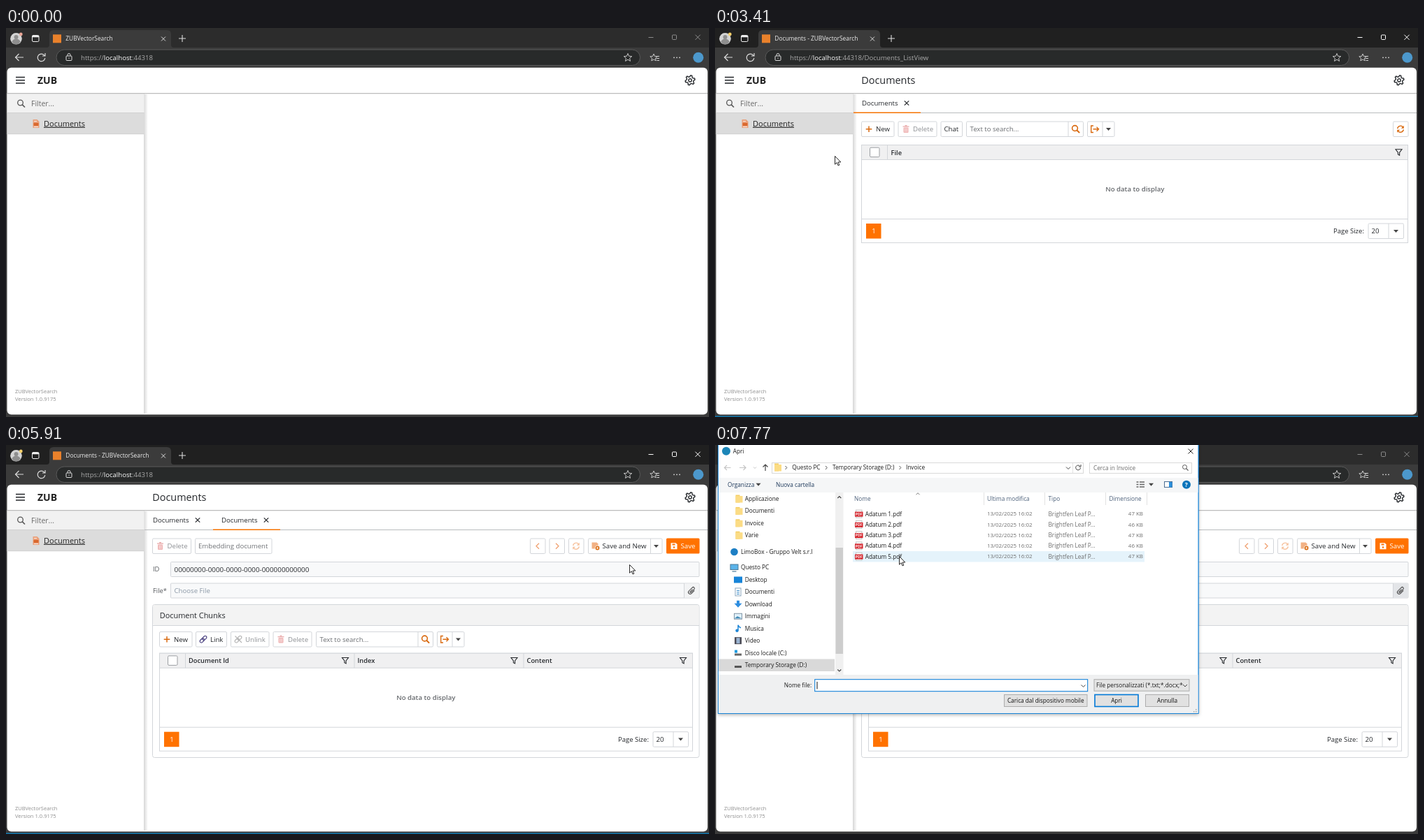
Animation of 1005x557 px, one loop 8000 ms. Source, as an HTML page:

```html
<!DOCTYPE html>
<html lang="it">
<head>
<meta charset="utf-8">
<title>Vector search demo</title>
<style>
  html, body { margin: 0; width: 100%; height: 100%; overflow: hidden; background: #3b3b3b; }
  svg { display: block; width: 1005px; height: 557px; font-family: "Open Sans", "Noto Sans", sans-serif; }
  text { white-space: pre; }
</style>
</head>
<body>
<svg id="stage" viewBox="0 0 1005 557"></svg>
<script>
const ORANGE = '#f57300', BTN = '#d3d6da', INK = '#24272b', PALE = '#f7c3a0', BLUE = '#0078d7';

// Drawing helpers; text is placed by its vertical centre.
const text = (x, y, s, size = 9.65, fill = INK, weight = 400, extra = '') =>
  `<text x="${x}" y="${y + size * .36}" font-size="${size}" fill="${fill}" font-weight="${weight}" ${extra}>${s}</text>`;
const rect = (x, y, w, h, fill = 'none', stroke = 'none', r = 0, extra = '') =>
  `<rect x="${x}" y="${y}" width="${w}" height="${h}" rx="${r}" fill="${fill}" stroke="${stroke}" ${extra}/>`;
const path = (d, stroke = INK, width = 1, fill = 'none') =>
  `<path d="${d}" stroke="${stroke}" stroke-width="${width}" fill="${fill}"/>`;
const dot = (x, y, r, fill, stroke = 'none', width = 1) =>
  `<circle cx="${x}" cy="${y}" r="${r}" fill="${fill}" stroke="${stroke}" stroke-width="${width}"/>`;
const at = (x, y, s) => `<g transform="translate(${x} ${y})">${s}</g>`;
const layer = (id, s) => `<g id="${id}">${s}</g>`;

// Small icons, each centred on its point.
const cross = (x, y, r, c, w = 1) => path(`M${x - r} ${y - r}l${2 * r} ${2 * r}m0 ${-2 * r}l${-2 * r} ${2 * r}`, c, w);
const plus = (x, y, r, c, w) => path(`M${x - r} ${y}h${2 * r}M${x} ${y - r}v${2 * r}`, c, w);
const caret = (x, y, c = '#444') => path(`M${x - 3.5} ${y - 2}h7l-3.5 4z`, 'none', 0, c);
const chevron = (x, y, c, r = 2.5) => path(`M${x - r} ${y - r / 2}l${r} ${r} ${r} ${-r}`, c);
const lens = (x, y, r, c, w) => dot(x - 1, y - 1, r, 'none', c, w) + path(`M${x - 1 + r * .7} ${y - 1 + r * .7}l${r} ${r}`, c, w * 1.25);
const funnel = (x, y) => path(`M${x - 4.5} ${y - 4.2}h9l-3.4 4.4v4l-2.2-1.2v-2.8z`, INK, 1.1);
const trash = (x, y) => path(`M${x - 4.5} ${y - 3.5}h9M${x - 1.5} ${y - 5}h3`, '#e9a9a9', 1.2) +
  rect(x - 3.5, y - 2.2, 7, 7.4, '#efb5b5', 'none', 1) + path(`M${x - 1.2} ${y - 1}v5m2.4-5v5`, '#fff', .7);
const cycle = (x, y, c) => path(`M${x - 4.3} ${y - .6}a4.4 4.4 0 0 1 8-2M${x + 4.3} ${y + .6}a4.4 4.4 0 0 1-8 2`, c, 1.4) +
  path(`M${x + 4.8} ${y - 5}v4h-4zM${x - 4.8} ${y + 5}v-4h4z`, 'none', 0, c);
const chain = (x, y, c) => at(x, y, `<g transform="rotate(-45)">${rect(-6, -2.1, 7, 4.2, 'none', c, 2.1, 'stroke-width="1.2"')}${rect(-1, -2.1, 7, 4.2, 'none', c, 2.1, 'stroke-width="1.2"')}</g>`);
const clip = (x, y) => at(x, y, `<g transform="rotate(45)">${path('M2.6-3V3a2.6 2.6 0 0 1-5.2 0V-4a1.8 1.8 0 0 1 3.6 0V2.5a.8.8 0 0 1-1.6 0V-2.5', '#444', 1)}</g>`);
const disk = (x, y, c) => path(`M${x - 4.5} ${y - 4.5}h7l2 2v7h-9z`, 'none', 0, c);
const star = (x, y, r) => path('M' + Array.from({ length: 10 }, (_, i) => {
  const a = i * Math.PI / 5, q = i % 2 ? r * .45 : r;
  return (x + q * Math.sin(a)).toFixed(1) + ' ' + (y - q * Math.cos(a)).toFixed(1);
}).join('L') + 'z', '#c8c8c8');
const gear = (x, y) => path('M' + Array.from({ length: 24 }, (_, i) => {
  const a = (i + .5) * Math.PI / 12, q = i % 4 < 2 ? 5 : 7;
  return (x + q * Math.cos(a)).toFixed(1) + ' ' + (y + q * Math.sin(a)).toFixed(1);
}).join('L') + 'z', INK, 1.4) + dot(x, y, 2.2, 'none', INK, 1.4);

// Page widgets.
const button = (x, y, w, label = '', labelX = 4.5, color = INK) =>
  rect(x, y, w, 21.5, '#fff', BTN, 1.5) + text(x + labelX, y + 10.7, label, 9.65, color);
const newButton = (x, y) => button(x, y, 46.5, 'New', 20.5) + plus(x + 10.5, y + 10.7, 4.3, '#d96a10', 1.5);
const deleteButton = (x, y) => button(x, y, 55, 'Delete', 21, '#8b8e92') + trash(x + 11, y + 10.7);
const searchBox = (x, y) => button(x, y, 167, 'Text to search...', 5, '#6a6d71') +
  path(`M${x + 145.5} ${y}v21.5`, BTN) + lens(x + 156, y + 10.5, 3.9, '#d96a10', 1.6);
const exportBox = (x, y) => button(x, y, 38.5) + path(`M${x + 21.5} ${y}v21.5`, BTN) + caret(x + 30, y + 11) +
  path(`M${x + 8.5} ${y + 6}h-3.3v9.5h3.3M${x + 8} ${y + 10.7}h8m-3-3l3 3-3 3`, '#d96a10', 1.4);

function grid(x, y, w, cols) {
  const right = x + w;
  return rect(x, y, w, 140, '#fff', BTN) + rect(x, y, w, 21, '#f0f0f1', BTN) +
    path(`M${x + 37} ${y}v21M${x} ${y + 106}h${w}`, BTN) +
    rect(x + 12, y + 3.7, 13.5, 13.5, '#fff', '#9a9da1', 1.5) +
    cols.map(([cx, name, end], i) => text(cx, y + 10.7, name, 9.3, INK, 600) + funnel(end, y + 10.5) +
      (i ? path(`M${cx - 4.5} ${y}v21`, BTN) : '')).join('') +
    text(600.3, y + 63.5, 'No data to display', 9.65, '#65686c', 600, 'text-anchor="middle"') +
    rect(x + 6.5, y + 112.5, 21.5, 21.5, '#ff7200') + text(x + 14.7, y + 123.2, '1', 9.5, '#fff') +
    text(right - 106.5, y + 123.2, 'Page Size:', 9.5) +
    rect(right - 56.5, y + 112.5, 50.5, 21.5, '#fff', BTN, 1.5) + text(right - 52, y + 123.2, '20', 9.65) +
    path(`M${right - 27.5} ${y + 112.5}v21.5`, BTN) + caret(right - 17, y + 123.4);
}
const pageTab = x => text(x, 107.5, 'Documents') + cross(x + 64, 107.5, 3.2, INK, 1.2);
const tabs = (...xs) => text(209.3, 74.8, 'Documents', 14.4, INK, 500) + path('M198 121.5H1003', '#b9bbbe') +
  xs.map(pageTab).join('') + path(`M${xs.at(-1) - 12} 121.3h96`, ORANGE, 1.6);

function browser() {
  const tool = '#dcdcdc';
  return rect(0, 0, 1005, 557, '#3b3b3b') + rect(0, 0, 1005, 28, '#202020', 'none', 0, 'id="bar"') +
    path('M58 28q4 0 4-4V9q0-6 6-6h162q6 0 6 6v15q0 4 4 4z', 'none', 0, '#3b3b3b') +
    dot(14.5, 15.3, 8.3, '#d4d4d4') + dot(14.5, 13, 3, '#8e8e8e') + path('M8.5 20.5a6 5 0 0 1 12 0a8 8 0 0 1-12 0z', 'none', 0, '#8e8e8e') +
    `<circle id="badge" cx="21.3" cy="9" r="2.4"/>` +
    rect(37.5, 10.5, 9.5, 9, 'none', '#eee', 1.5) + path('M37.5 12h9.5', '#eee', 2.5) +
    rect(67, 9.3, 12, 12, '#e9812b') + layer('title', text(85.3, 15.2, '', 8.35, '#eee')) +
    cross(225, 15.5, 3, '#ddd') + plus(252, 15, 5, '#ddd', 1.1) +
    layer('controls', path('M918.5 13.5h7', 'currentColor') + rect(952.5, 10, 6, 6.5, 'none', 'currentColor', 1) + cross(989, 13.3, 3.6, 'currentColor')) +
    path('M25 42H13.5m5-5l-5 5 5 5', tool, 1.2) +
    path('M55 39.5a5.3 5.3 0 1 0 .8 3.5M56 36v4h-4', tool, 1.2) +
    rect(72, 31, 834.5, 22.5, '#282a2a', '#5a5a5a', 11.2) +
    rect(86, 40, 8, 6.5, 'none', '#ddd', 1) + path('M88 40v-1.5a2 2 0 0 1 4 0V40M90 42.5v1.5', '#ddd') +
    `<text x="107" y="45.6" font-size="9.6" fill="#a9a9a9">https://<tspan fill="#fff">localhost</tspan>:44318<tspan id="route">/Documents_ListView</tspan></text>` +
    star(889, 42.5, 6) + star(926, 42.5, 5.5) + path('M929 40.5h5m-4.500 3h4.500m-3.500 3h3.500', '#d0d0d0') +
    [955, 959, 963].map(x => dot(x, 42.3, .9, '#ddd')).join('') + dot(989.7, 42.2, 7.5, '#4c98cc') +
    rect(0, 555.5, 1005, 1.5, '#1278ae', 'none', 0, 'id="edge"');
}

function shell() {
  return rect(1.5, 56.7, 1001.5, 496.8, '#fff', 'none', 6) +
    rect(198, 95, 5, 457, 'url(#shade)') + path('M197.500 94V552', '#d9d9d9') +
    rect(1.5, 94, 196, 27.5, '#f1f1f1') + rect(1.5, 121.5, 196, 30.5, '#dcdcdc') + path('M1.500 121.500h196M1.500 151.700h196', '#d0d0d0') +
    path('M1.500 93.700H1003', '#bcbcbc', 1.3) +
    path('M14 70.500h13M14 74.700h13M14 79h13', INK, 1.4) +
    text(45, 75, 'ZUB', 14, '#222', 700, 'font-stretch="75%"') + gear(978, 74.8) +
    lens(21.5, 108, 3.8, '#555', 1.3) + text(36, 107.800, 'Filter...', 10.5, '#6b6b6b') +
    path('M38.500 131h6l3 3v9h-9z', 'none', 0, '#eaa07a') + rect(39.5, 136, 7, 3.8, '#d9662c') + path('M40 133.500h4M40 141.500h6', '#fff', .8) +
    text(54, 136.800, 'Documents', 11, '#222', 500, 'text-decoration="underline"') +
    text(13, 520, 'ZUBVectorSearch', 7.5, '#8e8e8e') + text(13, 531, 'Version 1.0.9175', 7.6, '#8e8e8e');
}

function listView() {
  const y = 134;
  return tabs(210) + newButton(209.5, y) + deleteButton(262, y) + button(323, y, 30.5, 'Chat') +
    searchBox(359.5, y) + exportBox(532.5, y) + button(969.5, y, 21.5) + cycle(980, y + 10.7, '#d96a10') +
    grid(209.5, 167.5, 781, [[251.5, 'File', 977.5]]);
}

function detailView() {
  const y = 134, y2 = 267.5;
  return tabs(210, 308) + deleteButton(209.5, y) + button(270.5, y, 109.5, 'Embedding document', 4.5, '#6f7276') +
    button(749.5, y, 21.5) + path('M762 140.700l-4 4 4 4', '#f0a070', 1.3) +
    button(777, y, 21.5) + path('M786 140.700l4 4-4 4', '#f0a070', 1.3) +
    button(804.5, y, 21.5) + cycle(815, 144.7, PALE) +
    button(832.5, y, 105.5, 'Save and New', 20, INK) + path('M921.500 134v21.500', BTN) + caret(929.5, 145) +
    disk(842, 144, '#f2b184') + dot(845.5, 147.5, 3.4, '#d96a10', '#fff', .8) + plus(845.5, 147.5, 1.7, '#fff', .8) +
    rect(944, 133.5, 47.5, 22, '#ff7200', 'none', 1.5) + disk(955, 144.7, '#fff') + rect(952.5, 141.5, 4, 2, '#ff7200') + dot(955, 146.5, 1.3, '#ff7200') +
    text(964.5, 144.7, 'Save', 9.65, '#fff') +
    text(210, 178, 'ID', 9.4, '#55585c') + rect(235.5, 167.5, 755.5, 21, '#f8f9fa', BTN, 1) + text(240.5, 178, '00000000-0000-0000-0000-000000000000', 9.85) +
    text(210, 208.7, 'File*', 9.4, '#55585c') + rect(235.5, 198, 755.5, 21, '#f8f9fa', BTN, 1, 'id="field"') + text(240.5, 208.7, 'Choose File', 9.65, '#8a97a5') +
    rect(970, 198.5, 20.5, 20, '#f3f4f5', 'none', 0, 'id="pick"') + path('M969.500 198v21', BTN) + clip(980.2, 208.7) +
    rect(209.5, 228.5, 781.5, 219, '#fff', BTN, 3) + rect(210, 229, 780.5, 29, '#f3f3f3', 'none', 2.5) + path('M210 258.500h781', BTN) +
    text(219.8, 243.7, 'Document Chunks', 10.9) +
    newButton(219.5, y2) + button(271.5, y2, 44, 'Link', 20.5) + chain(282, 278.2, '#4a4180') +
    button(321.5, y2, 54.5, 'Unlink', 20.5, '#8b8e92') + chain(332, 278.2, '#b5b5b5') + path('M327.500 273.500l9.500 9.500', '#b5b5b5', 1.1) +
    deleteButton(382, y2) + searchBox(443.5, y2) + exportBox(616.5, y2) +
    grid(219.5, 298.2, 762, [[261, 'Document Id', 485], [502.5, 'Index', 726.5], [744.5, 'Content', 968]]);
}

const loading = () => rect(458, 289.7, 88.5, 31, '#fff', 'none', 15.5, 'filter="url(#soft)"') +
  path('M463.700 308.500A11 11 0 1 1 478 315.300', ORANGE, 2.4) + text(492.5, 305.2, 'Loading...', 9.65);

// File dialog.
const label = (x, y, s, fill = '#1c1c1c', extra = '') => text(x, y, s, 8.25, fill, 400, extra);
const folder = (x, y) => rect(x - 4.5, y - 5.5, 6, 11, '#f5cd62') + rect(x - 4.5, y - 4, 10, 9.5, '#fbdc85');
const frame = () => rect(4.5, -2, 686.5, 386.5, '#fff', '#1883d7', 0, 'filter="url(#soft)"') +
  rect(4.5, -2, 686.5, 386.5, '#fff', '#1883d7') + rect(5, 329, 685.5, 55, '#eff0f1') +
  dot(16, 8.7, 6, '#1c86b8') + label(25.7, 9.3, 'Apri') + cross(680, 9, 3.5, '#222');

const blanks = () => [[99, 338, 40, 11], [142, 335.5, 391, 17.5], [542, 335.5, 137, 17], [412, 356.5, 121, 19],
  [542, 356.5, 64, 19], [614, 356.5, 65, 19], [679, 372, 11.5, 12]].map(b => rect(...b, '#fff')).join('');

const places = [
  ['Desktop', (x, y) => rect(x - 6, y - 4.5, 12, 9, '#1784d8')],
  ['Documenti', (x, y) => rect(x - 4, y - 5.5, 8, 11, '#fff', '#8aa6bd') + path(`M${x - 2} ${y - 2}h4m-4 2.500h4m-4 2.500h4`, '#3a8bc8')],
  ['Download', (x, y) => path(`M${x - 2} ${y - 5}h4v4h3.500l-5.500 6-5.500-6h3.500z`, 'none', 0, '#2f8ee0')],
  ['Immagini', (x, y) => rect(x - 5.5, y - 4, 11, 8, '#dff0fb', '#8296a6') + path(`M${x - 5} ${y + 3}l4-3 6 3z`, 'none', 0, '#3d88b4')],
  ['Musica', (x, y) => path(`M${x} ${y + 3}v-8q1 3 4 4`, '#1f86d6', 1.5) + dot(x - 1.5, y + 3, 2.2, '#1f86d6')],
  ['Video', (x, y) => rect(x - 5, y - 5, 10, 10, '#4b4b55') + rect(x - 2.5, y - 4, 5, 8, '#9ab4d2')],
  ['Disco locale (C:)', (x, y) => rect(x - 5, y + 1, 10, 3, '#666') + rect(x - 5, y - 4, 4, 4, '#1c9ade')],
  ['Temporary Storage (D:)', (x, y) => rect(x - 5, y + 1, 10, 3, '#555')],
];

function dialogBody() {
  const grey = '#6d6d6d', head = '#4c607a', line = '#e2e2e2';
  const arrow = (x, c, turn) => at(x, 32.5, `<g transform="rotate(${turn})">${path('M4.500 0h-9m3.500-3.500L-4.500 0l3.500 3.500', c, 1.2)}</g>`);
  const step = x => path(`M${x - 1} 30l2.300 2.500-2.300 2.500`, '#555');
  const bar = arrow(18, '#c4c4c4', 0) + arrow(39.5, '#c4c4c4', 180) + chevron(57, 32.5, '#c4c4c4', 2) + arrow(72, '#444', 90) +
    rect(81.5, 25.5, 445, 15, '#fff', '#d9d9d9') + folder(89.5, 32) + step(101.5) + label(110.3, 32, 'Questo PC') + step(159) +
    label(168, 32, 'Temporary Storage (D:)') + step(264.5) + label(273, 32, 'Invoice') + chevron(505, 33, '#444', 3) + path('M511.500 26v14', line) +
    path('M521.500 30a3.400 3.400 0 1 0 1 2.500M523 28v3h-3', '#444') +
    rect(535.5, 25.5, 146, 15, '#fff', '#d9d9d9') + label(541, 32.7, 'Cerca in Invoice', grey) + lens(672.5, 32.5, 3, '#555', 1);
  const menu = rect(5, 47, 685.5, 21, '#f5f6f7') + label(18, 56.7, 'Organizza', '#1e395b') + caret(62, 56.8) + label(87, 56.7, 'Nuova cartella', '#1e395b') +
    path('M602.500 53h3m-3 3.500h3m-3 3.500h3M607 53h7m-7 3.500h7m-7 3.500h7', '#666', 1.3) + caret(623.5, 56.8) +
    rect(642.5, 52.5, 11, 8, '#fff', '#4d6f93') + rect(649, 53, 4.5, 7.5, '#2c8fdc') +
    dot(674, 56.8, 6, '#0b74ba') + text(671.8, 56.8, '?', 8.5, '#fff', 700);
  const tree = ['Applicazione', 'Documenti', 'Invoice', 'Varie'].map((s, i) =>
      folder(34, 77 + i * 17.4) + label(42.7, 77 + i * 17.4, s)).join('') +
    dot(27.5, 153, 5.3, '#1d7fc4') + label(37, 152.800, 'LimoBox - Gruppo Velt s.r.l') +
    rect(22, 171, 11, 7.5, '#5bb4ea', '#4b7896') + path('M24.500 181h6', '#4b7896', 1.2) + label(37, 175.5, 'Questo PC') +
    rect(5, 306.5, 166, 17.5, '#d9d9d9') +
    places.map(([s, icon], i) => icon(33, 193 + i * 17.43) + label(42.7, 193 + i * 17.43, s)).join('') +
    rect(172, 68, 11.5, 261, '#f0f0f0') + rect(172.5, 147, 10.5, 152, '#cdcdcd') +
    path('M175.300 76l2.500-2.500 2.500 2.500M175.300 321.500l2.500 2.500 2.500-2.500', '#444', 1.2);
  const cols = [['Nome', 199], ['Ultima modifica', 389], ['Tipo', 476.5], ['Dimensione', 563.5]];
  const files = cols.map(([s, x]) => label(x, 77.5, s, head)).join('') +
    [384.5, 471.5, 558.5, 617.5].map(x => path(`M${x} 68v18`, line)).join('') + path('M287.500 71.200l2.500-2.500 2.500 2.500', '#777') +
    rect(197, 152, 417, 15.5, '#e5f3fb', 'none', 0, 'id="hover"') +
    [47, 46, 47, 46, 47].map((kb, i) => {
      const y = 98.6 + i * 15.25;
      return rect(201.5, y - 5.5, 8.5, 11, '#fff', '#c5c5c5') + rect(200, y - 3, 11.5, 7, '#d3222a') + text(200.8, y + .5, 'PDF', 5, '#fff', 700) +
        label(214.7, y, `Adatum ${i + 1}.pdf`) + text(389, y, '13/02/2025 16:02', 7.95, grey) +
        label(476.5, y, 'Brightfen Leaf P...', grey) + text(612, y, `${kb} KB`, 7.95, grey, 400, 'text-anchor="end"');
    }).join('');
  const foot = label(98.7, 344, 'Nome file:') + rect(142.7, 335.7, 390, 17, '#fff', BLUE) + path('M146 339v10.500', '#111') + chevron(526.5, 345, '#444', 3) +
    rect(542, 335.7, 136, 16.5, '#e4e4e4', '#adadad') + label(545, 344, 'File personalizzati (*.txt;*.docx;*') + chevron(672, 344.5, '#444', 3) +
    [[413.5, 118.5, 'Carica dal dispositivo mobile'], [543, 62, 'Apri'], [615.5, 62, 'Annulla']].map(([x, w, s]) =>
      rect(x, 357.5, w, 17, '#e1e1e1', s == 'Apri' ? BLUE : '#adadad', 0, s == 'Apri' ? 'stroke-width="1.6"' : '') +
      label(x + w / 2, 366, s, '#111', 'text-anchor="middle"')).join('') +
    [[687, 378], [687, 381], [684, 381]].map(([x, y]) => rect(x, y, 1.5, 1.5, '#aaa')).join('');
  return bar + menu + tree + files + foot;
}

const stage = document.getElementById('stage');
stage.innerHTML = `<defs>
  <linearGradient id="shade"><stop stop-color="#000" stop-opacity=".13"/><stop offset="1" stop-color="#000" stop-opacity="0"/></linearGradient>
  <filter id="soft" x="-20%" y="-30%" width="140%" height="170%"><feDropShadow dx="0" dy="1.5" stdDeviation="2.5" flood-opacity=".3"/></filter>
  </defs>` + browser() + shell() + layer('list', listView()) + layer('detail', detailView()) + layer('loading', loading()) +
  layer('dialog', frame()) + layer('blanks', blanks()) + layer('body', dialogBody()) +
  `<circle id="press" r="9" fill="#f2e21c" fill-opacity=".72"/><circle id="ring" r="19" fill="none" stroke="#f2e21c" stroke-width="2" stroke-opacity=".6"/>` +
  layer('arrow', path('M.5.5V12.200L3.200 9.700 5 13.900 6.800 13.200 5 9H8.800Z', '#111', .9, '#fff')) +
  layer('hand', path('M-1.300 1Q0-.6 1.300 1V6L6.300 7.100Q8 7.500 7.700 9.500L6.600 15.500H-.6L-3.900 10.600Q-4.300 8.700-2.500 9.200L-1.300 10.200Z', '#111', 1, '#fff') +
    path('M3 7v2.500M5 7.500v2', '#111', .6));

const el = Object.fromEntries([...stage.querySelectorAll('[id]')].map(e => [e.id, e]));
const tabTitle = el.title.firstChild;

// Pointer stops: time, x, y.
const stops = [
  [0, 717, 600], [280, 717, 553], [620, 611, 439], [930, 1, 112], [1240, 57, 132], [1550, 100, 135],
  [2170, 363, 149], [2480, 278, 190], [3410, 171, 183], [3720, 221, 150], [4030, 229, 143], [4680, 290, 181],
  [4990, 396, 210], [5290, 462, 255], [5600, 825, 202], [5910, 891, 171], [6220, 942, 206], [6530, 978, 210],
  [6840, 978, 205], [7150, 801, 233], [7460, 520, 232], [7770, 263, 159],
];
const LOOP = 8000;

function draw(t) {
  const within = (a, b = LOOP) => t >= a && t < b;
  const show = (id, on) => { el[id].style.display = on ? '' : 'none'; };
  const paint = (id, fill) => el[id].setAttribute('fill', fill);
  const move = (id, x, y) => el[id].setAttribute('transform', `translate(${x} ${y})`);

  const active = within(1550, 7150);
  paint('bar', active ? '#202020' : '#2c2c2c');
  paint('edge', active ? '#1278ae' : '#3b3b3b');
  paint('badge', active ? '#f3cf6a' : '#e8a596');
  el.controls.style.color = active ? '#fff' : '#8c8c8c';
  tabTitle.textContent = (t >= 2170 ? 'Documents - ' : '') + 'ZUBVectorSearch';

  show('route', within(1860, 4680));
  show('list', within(1860, 4990));
  show('detail', t >= 4990);
  show('loading', within(4990, 5290));
  show('dialog', t >= 7150);
  show('blanks', within(7150, 7460));
  show('body', t >= 7460);
  show('hover', t >= 7770);
  paint('pick', t >= 7150 ? '#e3e5e8' : t >= 6530 ? '#d5d7da' : '#f3f4f5');
  el.field.setAttribute('stroke', within(6840, 7150) ? '#f5b48a' : BTN);

  const [, x, y] = stops.findLast(s => s[0] <= t);
  const hand = within(1240, 2170) || within(3720, 4680);
  show('hand', hand);
  show('arrow', !hand);
  move(hand ? 'hand' : 'arrow', x, y);

  const spot = t < 3000 ? [100, 135] : [229, 143];
  show('press', within(1550, 1860) || within(4340, 4680));
  show('ring', within(1860, 2170) || within(4680, 4990));
  move('press', ...spot);
  move('ring', ...spot);
}

const start = performance.now();
(function tick() {
  draw((performance.now() - start) % LOOP);
  requestAnimationFrame(tick);
})();
</script>
</body>
</html>
```
